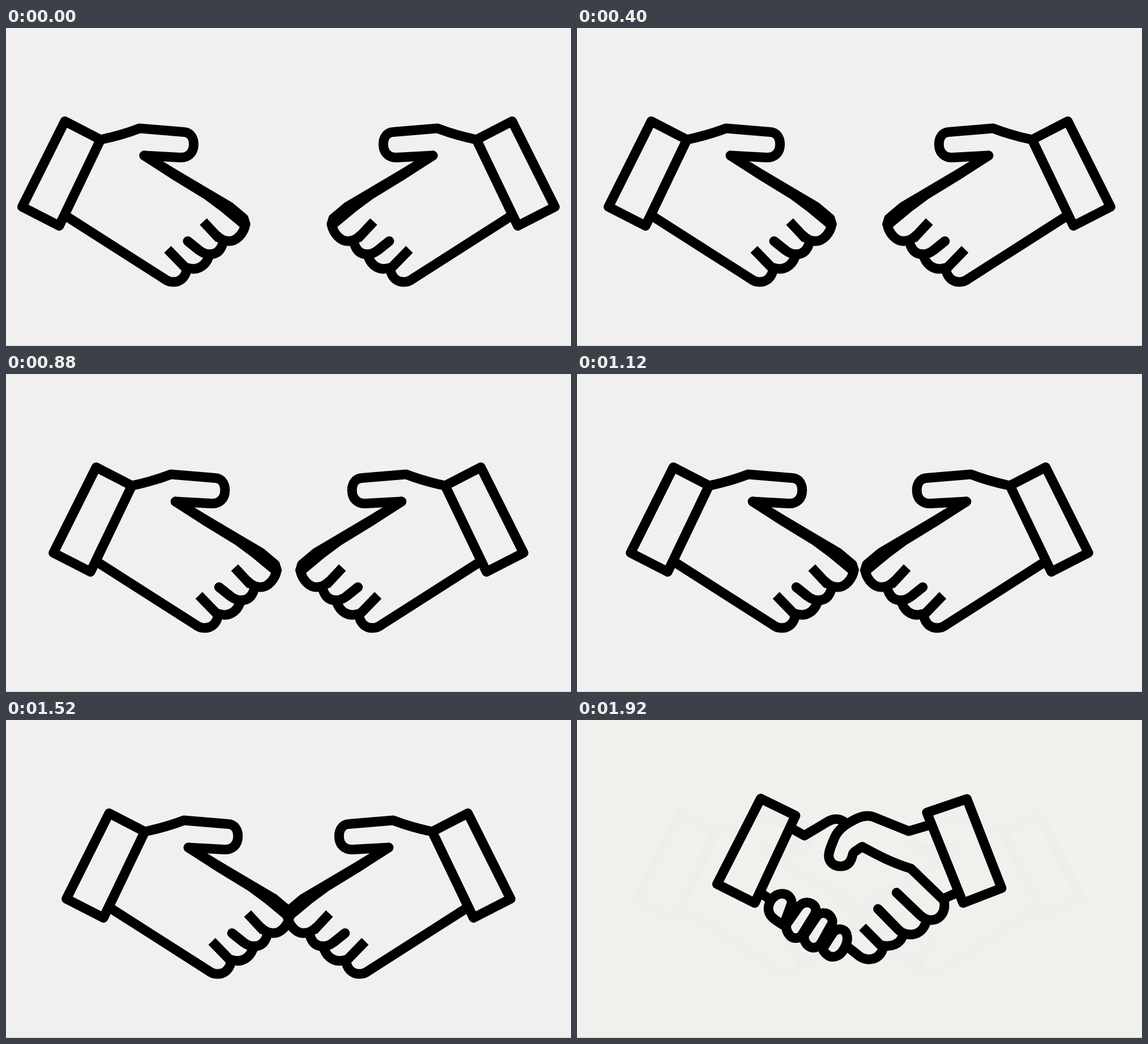
Recreate the animation shown at these times as an HTML page. Size 998 by 561 pixels, loop 2.64 s.

```html
<!DOCTYPE html>
<html lang="en">
<head>
<meta charset="utf-8">
<title>Handshake</title>
<style>
html, body { margin: 0; height: 100%; overflow: hidden; background: #f0f0f0; }
svg { display: block; width: 100vw; height: 100vh; }
path { fill: none; stroke-linejoin: round; stroke-linecap: round; }
.stub { stroke-linecap: butt; }
#hand { stroke-width: 17; }
#shake { stroke-width: 26; stroke: #000; }
</style>
</head>
<body>
<svg viewBox="0 0 998 561" preserveAspectRatio="none">
  <defs>
    <g id="hand">
      <!-- cuff -->
      <path d="M104 164.5L167 197L94 349L28.5 315.5Z"/>
      <!-- thumb -->
      <path d="M167 197Q205 189 236 177L314 183.5C325 184 331.500 193 331.500 205C331.500 220 322 229 308 228.500L244 225"/>
      <!-- index finger -->
      <path d="M244 225L300 259L361 295L395 315L420 336L423 346M244 225L300 261L354 294L385 317L420 346"/>
      <path d="M423 346C420 362 408 376 394 376C384 376 378 372 372 366"/>
      <!-- other fingers and palm edge -->
      <path d="M321 376L341 392C349 398 354 399 361 399C374 399 380 390 383 380"/>
      <path d="M320 423C338 429 352 420 358 404"/>
      <path d="M319 428C316 440 308 448 295 448C288 448 284 446 279 442L108 333"/>
      <path class="stub" d="M348.500 341.500L377 372M285.500 390.500L319 425"/>
    </g>
    <g id="shake">
      <!-- cuffs -->
      <path d="M232 63L326 109L216 345L114 294Z"/>
      <path d="M789 64L681 101L779 345L883 305Z"/>
      <!-- left wrist -->
      <path d="M318 145L350 163L412 126C430 115 448 117 460 128M230 317L258 335"/>
      <!-- right hand -->
      <path d="M690 134L632 151L540 114C520 105 500 112 480 123C455 136 440 150 432 168C424 187 416 205 416 218C416 232 427 246 448 246C466 246 475 235 479 221C481 211 482 209 488 205L506 193C550 217 590 238 638 252L727 338C734 370 715 391 693 391C680 391 672 386 664 379L599 317"/>
      <path d="M765 316L727 333"/>
      <path d="M549 361L600 413C612 426 622 430 638 430C656 430 670 418 677 402"/>
      <path d="M564 460C585 464 607 455 614 438"/>
      <path d="M561 472C555 488 542 497 524 497C512 497 505 493 498 488L470 466"/>
      <path class="stub" d="M507 410L562 465"/>
      <!-- left fingers -->
      <path d="M316 345C315 330 305 320 290 320C270 320 253 340 253 360C253 378 265 388 294 405Z"/>
      <path d="M301 403L335 355C345 343 358 341 370 347C384 355 383 368 376 379L343 432C335 443 318 442 310 432C303 424 300 415 301 403Z"/>
      <path d="M349 432L382 383C392 368 412 369 421 382C428 393 427 398 421 407L396 452C388 466 372 470 360 460C351 452 349 445 349 432Z"/>
      <path d="M401 466L428 424C440 411 458 414 464 428C468 440 466 452 460 464L452 477C441 491 423 495 411 484C402 476 399 472 401 466Z"/>
    </g>
  </defs>
  <rect id="back" width="998" height="561"/>
  <g id="hands">
    <use id="left" href="#hand"/>
    <use id="right" href="#hand"/>
  </g>
  <use id="clasp" href="#shake"/>
  <rect y="560" width="998" height="1" fill="#ccc"/>
</svg>
<script>
const LOOP = 2640, STEP = 80, MEET = 1680, SETTLE = 240, ZOOM = 1.53;
const [back, hands, left, right, clasp] =
  ["back", "hands", "left", "right", "clasp"].map(id => document.getElementById(id));

const mix = (a, b, p) => `rgb(${a.map((v, i) => Math.round(v + (b[i] - v) * p))})`;
const zoomAt = s => `translate(499 281) scale(${s}) translate(-499 -281)`;

function draw(now) {
  const t = Math.floor(now % LOOP / STEP) * STEP;
  const met = t >= MEET;
  const p = Math.min(1, Math.max(0, (t - MEET) / SETTLE));
  const zoom = met ? 1 + (ZOOM - 1) * (1 - p) ** 2 : 1;
  const shift = met ? 78.5 : 81.3 * Math.sin(0.00085 * t);

  left.setAttribute("transform", `translate(${shift} 0)`);
  right.setAttribute("transform", `translate(${998 - shift} 0) scale(-1 1)`);
  hands.setAttribute("transform", zoomAt(zoom));
  hands.setAttribute("stroke", met ? mix([236, 237, 232], [238, 238, 237], p) : "#000");
  back.setAttribute("fill", met ? mix([241, 242, 238], [240, 241, 236], p) : "#f0f0f0");

  clasp.style.display = met ? "" : "none";
  clasp.setAttribute("transform", zoomAt(zoom / ZOOM));
  clasp.style.filter = zoom > 1 ? `blur(${2 * (zoom - 1)}px)` : "none";
  requestAnimationFrame(draw);
}
requestAnimationFrame(draw);
</script>
</body>
</html>
```
